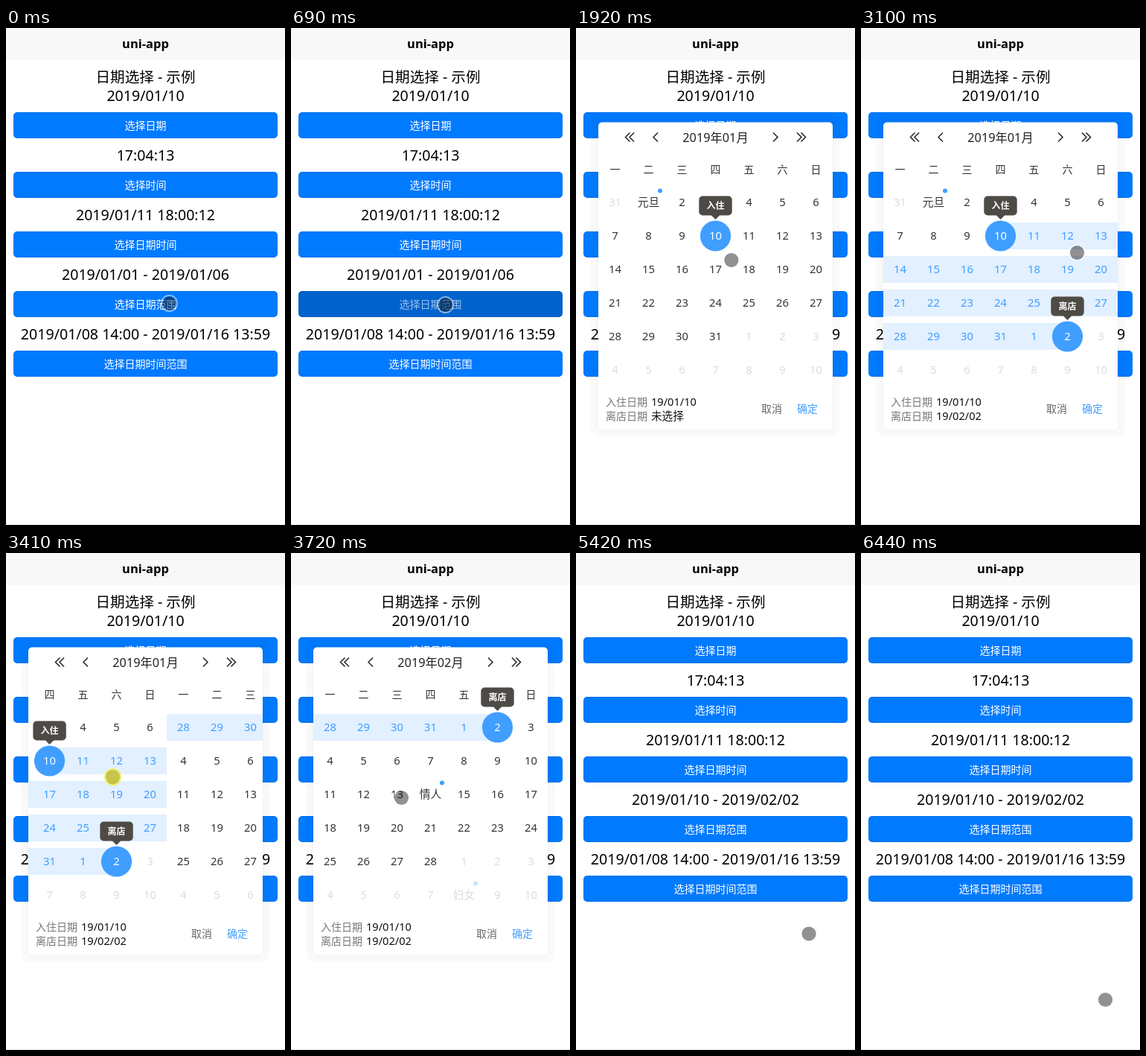
These frames come from a looping animation (375x667 px, 6520 ms). An HTML page:

```html
<!DOCTYPE html>
<html lang="zh-CN">
<head>
<meta charset="utf-8">
<title>uni-app</title>
<style>
  html, body { margin: 0; width: 100%; height: 100%; overflow: hidden; background: #fff; }
  svg { position: absolute; left: 0; top: 0; width: 375px; height: 667px; }
  text { font-family: "Noto Sans", "Noto Sans CJK SC", sans-serif; white-space: pre; }
  #card {
    position: absolute; left: 30px; top: 126px; width: 315px; height: 413px;
    transform: translateY(.5px); border-radius: 5px; background: #fff;
    box-shadow: 0 0 6px rgba(0, 0, 0, .05), 0 0 0 10px rgba(0, 0, 0, .02);
  }
</style>
</head>
<body>
<svg id="page" viewBox="0 0 375 667"></svg>
<div id="modal">
  <div id="card"></div>
  <svg viewBox="0 0 375 667">
    <defs><clipPath id="clip"><rect x="30" y="166" width="315" height="315"/></clipPath></defs>
    <g id="frame"></g>
    <g clip-path="url(#clip)"><g id="swiper"></g></g>
  </svg>
</div>
<svg viewBox="0 0 375 667">
  <g id="cursor"><circle id="ring" r="10.5" fill="none" stroke-width="2"/><circle id="dot" r="9.6"/></g>
</svg>
<script>
const LOOP = 6520, STEP = 77.5, BLUE = '#409eff', INK = '#333', CELL = 45, PANEL = 7 * CELL;
const $ = id => document.getElementById(id);

// Pointer moves: start, end, target x, y
const home = [219, 369];
const moves = [
  [0, 150, 207, 371], [910, 1500, 188, 281], [1740, 2300, 278, 414], [2560, 3090, 290, 301],
  [3130, 3480, 126, 300], [3500, 3700, 148, 328], [3720, 4330, 320, 484], [4330, 4410, 313, 511],
  [5400, 5740, 269, 463], [5740, 6040, 286, 494], [6060, 6430, 328, 599]
];
const presses = [[380, 530], [1680, 1830], [2380, 2530], [3170, 3500], [4530, 4800]];
// Motion is stepped, and the steps restart at each beat
const beats = [0, 910, 1680, 2380, 3100, 3790, 5420, 6120];

function ease(t, from, to) {
  const p = Math.min(1, Math.max(0, (t - from) / (to - from)));
  return p * p * (3 - 2 * p);
}
const mix = (a, b, p) => a + (b - a) * p;

function stepped(t) {
  const beat = beats.filter(b => b <= t).pop();
  return beat + STEP * Math.floor((t - beat) / STEP);
}

const pointer = t => moves.reduce(([x, y], [from, to, tx, ty]) => {
  const p = ease(t, from, to);
  return [mix(x, tx, p), mix(y, ty, p)];
}, home);

function text(x, y, str, size, fill, extra = 'text-anchor="middle"') {
  return `<text x="${x}" y="${y + size * .36}" font-size="${size}" fill="${fill}" ${extra}>${str}</text>`;
}
const rect = (x, y, w, h, fill, r = 0) =>
  `<rect x="${x}" y="${y}" width="${w}" height="${h}" rx="${r}" fill="${fill}"/>`;
const circle = (x, y, r, fill) => `<circle cx="${x}" cy="${y}" r="${r}" fill="${fill}"/>`;

function button(y, label, down) {
  return rect(10, y, 355, 35, down ? '#0062cc' : '#007aff', 5)
    + `<rect x="10.5" y="${y + .5}" width="354" height="34" rx="4.5" fill="none" stroke="#000" stroke-opacity=".08"/>`
    + text(187.5, y + 18, label, 14, down ? 'rgba(255,255,255,.6)' : '#fff');
}

function drawPage(range, active) {
  const rows = [
    ['2019/01/10', '日期'], ['17:04:13', '时间'], ['2019/01/11 18:00:12', '日期时间'],
    [range, '日期范围'], ['2019/01/08 14:00 - 2019/01/16 13:59', '日期时间范围']
  ];
  return rect(0, 0, 375, 43, '#f8f8f8')
    + text(187.5, 21, 'uni-app', 16.5, '#000', 'text-anchor="middle" font-weight="700"')
    + text(187.5, 66, '日期选择 - 示例', 19.6, '#000')
    + rows.map(([value, label], i) =>
      text(187.5, 91 + 80 * i, value, 19.6, '#000')
      + button(113 + 80 * i, '选择' + label, active && i === 3)).join('')
    + rect(0, 666, 375, 1, '#e0e0e0');
}

// Days count from 2018/12/31, the first cell of January
const dateOf = day => new Date(2018, 11, 31 + day);
const holidays = { '0-1': '元旦', '1-14': '情人', '2-8': '妇女' };
const two = n => String(n).padStart(2, '0');
function shortDate(day) {
  if (day == null) return '未选择';
  const d = dateOf(day);
  return `${d.getFullYear() % 100}/${two(d.getMonth() + 1)}/${two(d.getDate())}`;
}

function tip(x, y, label) {
  return rect(x - 22.2, y - 53.5, 44.4, 26, '#4e4b46', 5)
    + `<path d="M${x - 6} ${y - 28}h12l-6 6z" fill="#4e4b46"/>`
    + text(x, y - 40, label, 12, '#fff', 'text-anchor="middle" font-weight="700"');
}

function drawMonth(month, first, left, [begin, end]) {
  let bands = '', cells = '', tips = '';
  [...'一二三四五六日'].forEach((s, i) => {
    cells += text(left + CELL * (i + .5), 189.5, s, 14, INK);
  });
  for (let i = 0; i < 42; i++) {
    const day = first + i, date = dateOf(day);
    const x = left + CELL * (i % 7 + .5), y = 234 + CELL * Math.floor(i / 7);
    const edge = day === begin || day === end;
    const inside = end != null && day >= begin && day <= end;
    const other = date.getMonth() !== month;
    const holiday = holidays[date.getMonth() + '-' + date.getDate()];
    if (inside) {
      const from = day === begin ? x : x - CELL / 2, to = day === end ? x : x + CELL / 2;
      bands += rect(from, y - 18, to - from, 36, '#e2f0ff');
    }
    if (edge) {
      cells += circle(x, y, 20.6, BLUE);
      tips += tip(x, y, day === begin ? '入住' : '离店');
    }
    const fill = edge ? '#fff' : inside ? BLUE : other ? '#dcdcdc' : INK;
    cells += text(x, y, holiday || date.getDate(), 14.8, fill);
    if (holiday) cells += circle(x + 15.5, y - 15.5, 3, edge ? '#fff' : other ? '#c6e2ff' : BLUE);
  }
  return bands + cells + tips;
}
const drawMonths = picked =>
  drawMonth(0, 0, 30, picked) + drawMonth(1, 28, 30 + PANEL, picked);

function drawFrame(title, [begin, end]) {
  const chevron = (x, dir) => `M${x - 3 * dir} 140.5l${6 * dir} 6l${-6 * dir} 6`;
  const arrows = [69.5, 75, 107].map(x => chevron(x, -1) + chevron(375 - x, 1)).join('');
  const start = 'text-anchor="start"';
  const row = (y, label, day) =>
    text(40, y, label, 14, '#777', start) + text(101, y, shortDate(day), 14.6, '#111', start);
  return `<path d="${arrows}" fill="none" stroke="#222" stroke-width="1.5"/>`
    + text(187.5, 147, title, 16.3, '#222')
    + row(502, '入住日期', begin) + row(521, '离店日期', end)
    + text(263, 511, '取消', 14, '#666') + text(311, 511, '确定', 14, BLUE);
}

// Redraw a group only when its state changes
const cache = {};
function show(id, draw, ...args) {
  const key = JSON.stringify(args);
  if (cache[id] !== key) { cache[id] = key; $(id).innerHTML = draw(...args); }
}

function render(t) {
  const s = stepped(t), [x, y] = pointer(s);
  const picked = t < 1830 ? [1, 6] : t < 2530 ? [10, null] : [10, 33];
  const down = presses.some(([a, b]) => t >= a && t < b);
  // The month follows the drag, then glides to the next panel
  const drag = s < 3130 ? 0 : Math.min(0, pointer(Math.min(s, 3500))[0] - 272);
  const shift = mix(drag, -PANEL, ease(s, 3500, 3720));

  show('page', drawPage, t < 5030 ? '2019/01/01 - 2019/01/06' : '2019/01/10 - 2019/02/02', t >= 690 && t < 910);
  show('frame', drawFrame, `2019年0${t < 3570 ? 1 : 2}月`, picked);
  show('swiper', drawMonths, picked);
  $('swiper').setAttribute('transform', `translate(${shift})`);
  $('modal').style.display = t >= 910 && t < 4960 ? '' : 'none';
  $('cursor').setAttribute('transform', `translate(${x + .5} ${y + .5})`);
  $('ring').setAttribute('stroke', down ? 'rgba(242,238,80,.9)' : 'rgba(255,255,255,.5)');
  $('dot').setAttribute('fill', down ? 'rgba(188,184,40,.82)' : 'rgba(0,0,0,.43)');
}

const born = performance.now();
function loop() {
  render((performance.now() - born) % LOOP);
  requestAnimationFrame(loop);
}
loop();
</script>
</body>
</html>
```
